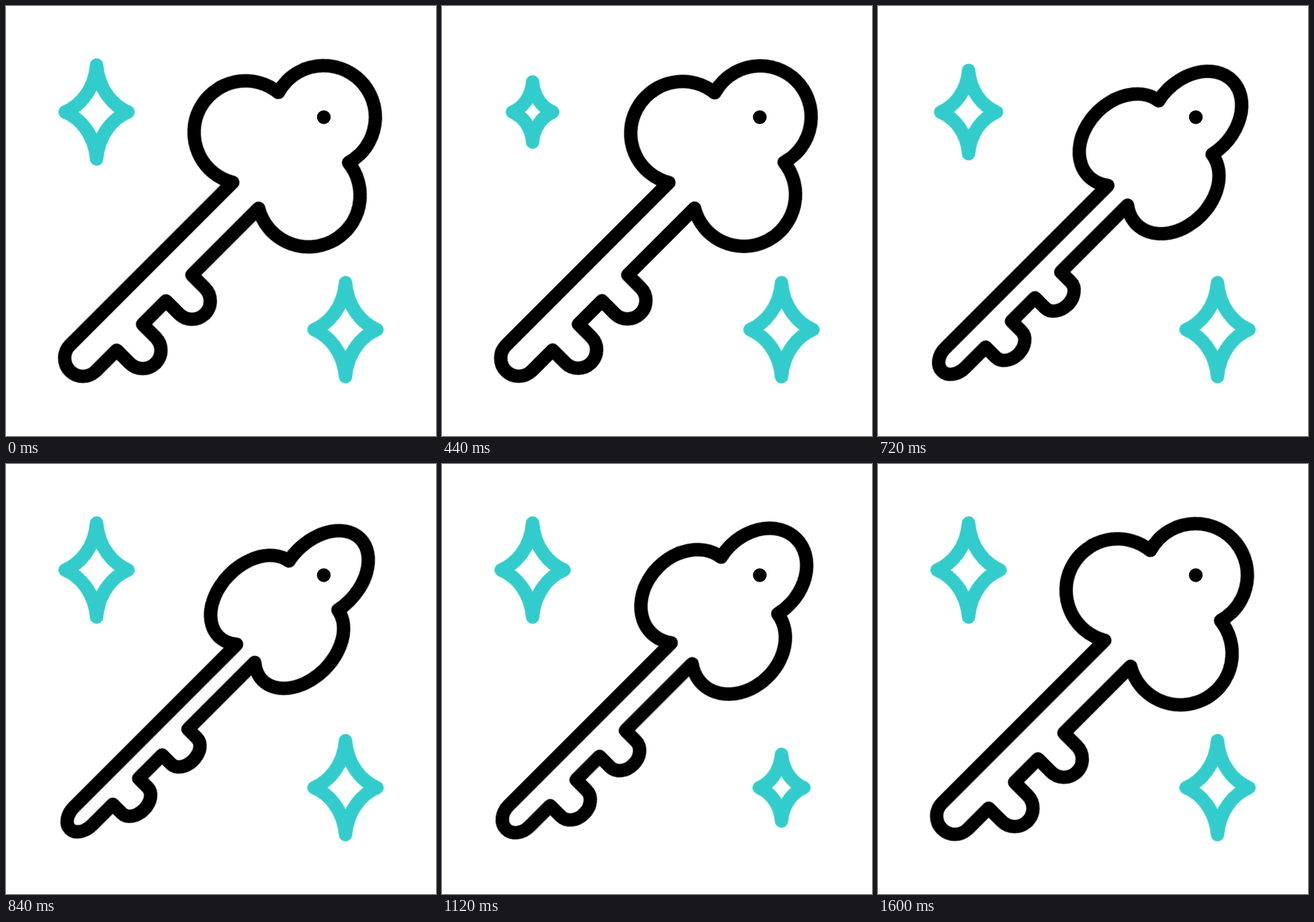
Recreate the animation shown at these times as an HTML page. Size 640 px wide and 640 px high, loop 2 s.

```html
<!DOCTYPE html>
<html lang="en">
<head>
<meta charset="utf-8">
<title>Key</title>
<style>
  html, body { margin: 0; width: 100%; height: 100%; overflow: hidden; background: #fff; }
  svg { display: block; width: 100%; height: 100%; }

  .line {
    fill: none;
    stroke-width: 20px;
    stroke-linecap: round;
    stroke-linejoin: round;
    vector-effect: non-scaling-stroke;
    animation: 2s cubic-bezier(.333, 0, .667, 1) infinite;
  }
  .key { stroke: #000; animation-name: squeeze; }
  .star { stroke: #3cc; }
  .first { animation-name: twinkle-first; }
  .second { animation-name: twinkle-second; }

  /* The key turns thin across its own axis; line weight stays constant. */
  @keyframes squeeze {
    0%, 19.4%, 69.6%, 100% { transform: scaleY(1); }
    43.25%, 46.7% { transform: scaleY(.697); }
  }
  @keyframes twinkle-first {
    0%, 12%, 40.8%, 100% { transform: scale(1); }
    26.25% { transform: scale(.544); }
  }
  @keyframes twinkle-second {
    0%, 45.7%, 79%, 100% { transform: scale(1); }
    62.5% { transform: scale(.565); }
  }
</style>
</head>
<body>
<svg viewBox="0 0 640 640">
  <g transform="translate(319.25 319.25) rotate(-45)">
    <path class="line key" d="M53 -27.2 H-289.6 A27.2 27.2 0 0 0 -289.6 27.2
      H-245.7 V54.8 A27.2 27.2 0 0 0 -191.3 54.8 V27.2
      H-141.9 V54.8 A27.2 27.2 0 0 0 -87.5 54.8 V27.2
      H53 A76.8 76.8 0 1 0 195.6 73.9
      A77 77 0 1 0 195.6 -73.9
      A76.8 76.8 0 1 0 53 -27.2 Z"/>
  </g>
  <circle cx="473" cy="165.5" r="10.2"/>

  <defs>
    <path id="spark" d="M0 -70 C3 -33 25 -9 46.8 0 C25 9 3 33 0 70
      C-3 33 -25 9 -46.8 0 C-25 -9 -3 -33 0 -70 Z" vector-effect="non-scaling-stroke"/>
  </defs>
  <g transform="translate(134.8 157.8)"><use class="line star first" href="#spark"/></g>
  <g transform="translate(505.3 481.7)"><use class="line star second" href="#spark"/></g>
</svg>
</body>
</html>
```
